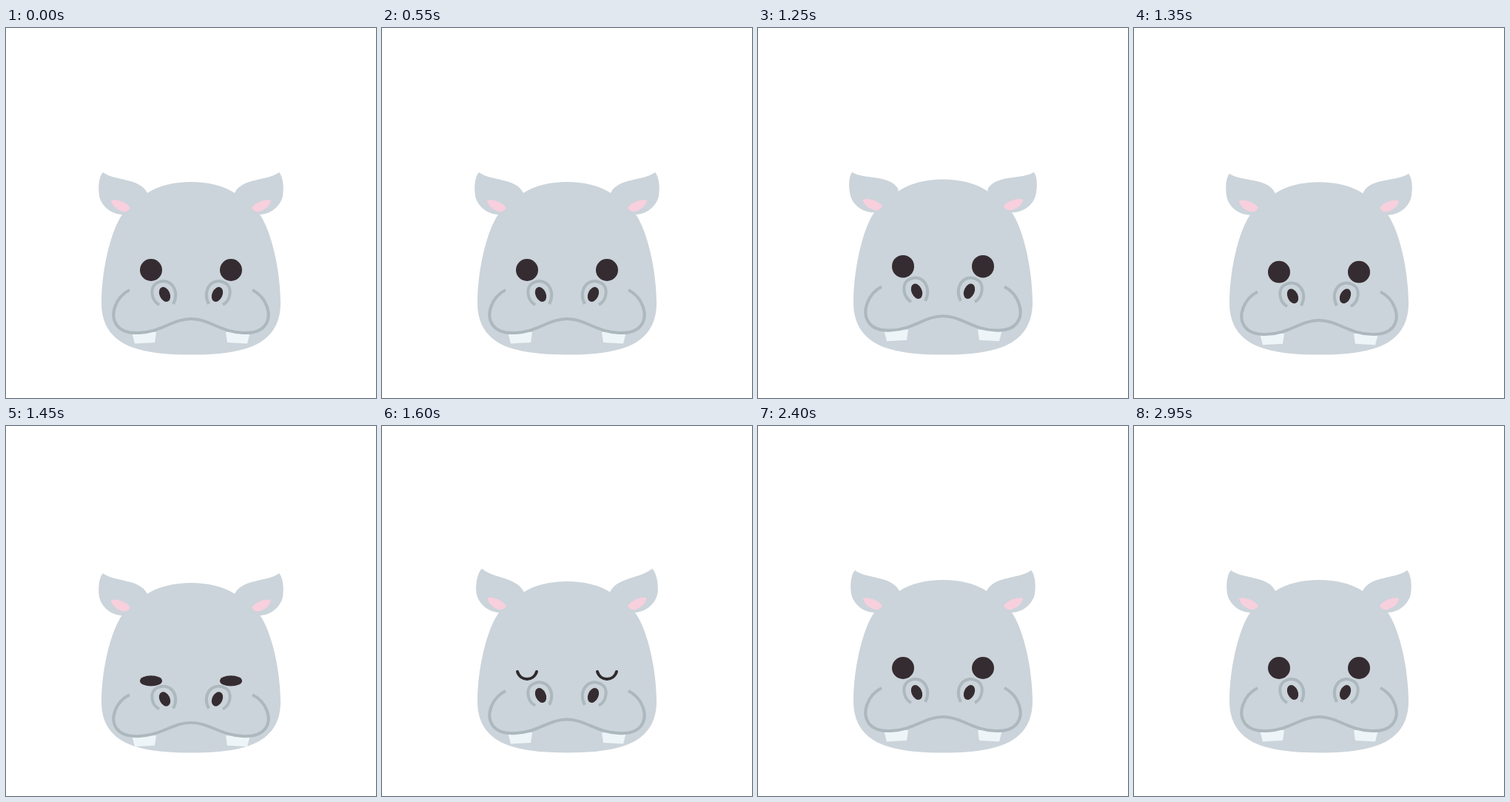
Recreate the animation shown at these times as an HTML page. Size 500x500 px, loop 3000 ms.

```html
<!DOCTYPE html>
<html lang="en">
<head>
<meta charset="utf-8">
<title>Blinking hippo</title>
<style>
  html, body { margin: 0; width: 100%; height: 100%; overflow: hidden; background: #fff; }
  svg { display: block; width: 100vw; height: 100vh; }
  .skin { fill: #cbd4da; }
  .line { fill: none; stroke: #acb8bd; stroke-width: 4; }
  .dark { fill: #352c31; }
</style>
</head>
<body>
<svg viewBox="0 0 500 500">
  <g id="half">
    <path id="head" class="skin" d="M250 208 C228 208 206 213 191 223 C177 232 165 242 157 252 C140 277 129 331 129 372 C129 405 147 425 177 433.500 C199 440 224 441.500 250 441.500Z"/>
    <path id="ear" class="skin" d="M131 195 C146 207 181 202 191 223 L190 245 L160 252 C143 253 129 241 126 227 C124 214 126 200 131 195Z"/>
    <path id="inner" fill="#f8cfdd" d="M142 233 C149 230 164 236 168 243 C166 246 163 249 158 248 C150 246 143 240 142 233Z"/>
    <g id="face">
      <path fill="#eef5f8" d="M170 411 H203 L201 425 L174 426.500Z"/>
      <path class="line" d="M167 354 C149 363 139 387 150 402 C157 411 168 412.500 179 412 C211 411 225 393 250 393"/>
      <path class="line" d="M207 374 C196 368 193 349 205 344 C221 336 236 354 226 373"/>
      <ellipse class="dark" cx="214.500" cy="360" rx="7" ry="10.500" transform="rotate(-24 214.500 360)"/>
      <ellipse id="eye" class="dark" cx="196" rx="15"/>
      <path id="lid" d="M183 327.500 C187 341 205 341 209 327.500" fill="none" stroke="#2f292d" stroke-width="4" stroke-linecap="round"/>
    </g>
  </g>
  <use href="#half" transform="translate(500) scale(-1 1)"/>
</svg>
<script>
const LOOP = 3000, STEP = 50;
const CHIN = 441.5, HEAD_TOP = 208, NOSE = 360, FACE_BASE = 620;
const EYE_BOTTOM = 342, EYE_R = 15;

// Offsets of each part in px, and the ear turn in degrees
const REST = { nose: 0, top: 0, ear: 0, turn: 0 };
const poses = [
  { t: 950, ...REST },
  { t: 1250, nose: -4.3, top: -3.5, ear: -3.5, turn: -5 },
  { t: 1450, nose: 9, top: 4, ear: 4, turn: 0 },
  { t: 1600, nose: 4, top: 2, ear: 0.5, turn: 5 },
  { t: 1800, ...REST },
];

const part = id => document.getElementById(id);
const move = (id, transform) => part(id).setAttribute("transform", transform);
const mix = (a, b, p) => a + (b - a) * p;

function ease(from, to, t) {
  const p = Math.min(1, Math.max(0, (t - from) / (to - from)));
  return p * p * (3 - 2 * p);
}

function poseAt(t) {
  const i = Math.max(1, poses.findIndex(p => p.t >= t));
  const a = poses[i - 1], b = poses[i], p = ease(a.t, b.t, t);
  return Object.fromEntries(Object.keys(REST).map(k => [k, mix(a[k], b[k], p)]));
}

// Vertical stretch that keeps `base` still and shifts height `y` by `dy`
function stretch(base, y, dy) {
  const s = 1 - dy / (base - y);
  return `translate(0 ${base * (1 - s)}) scale(1 ${s})`;
}

function draw(t) {
  const { nose, top, ear, turn } = t < poses.at(-1).t ? poseAt(t) : REST;
  move("head", stretch(CHIN, HEAD_TOP, top));
  move("face", stretch(FACE_BASE, NOSE, nose));
  move("ear", `translate(0 ${ear}) rotate(${turn} 165 240)`);
  move("inner", `translate(0 ${ear * 0.6}) rotate(${turn / 2} 165 240)`);

  // The upper lid drops while the bottom of the eye stays put
  const open = 1 - ease(1350, 1550, t) + ease(1600, 1800, t);
  const closed = open < 0.2;
  part("eye").setAttribute("ry", EYE_R * open);
  part("eye").setAttribute("cy", EYE_BOTTOM - EYE_R * open);
  part("eye").style.display = closed ? "none" : "";
  part("lid").style.display = closed ? "" : "none";
}

const start = performance.now();
function tick() {
  const t = (performance.now() - start) % LOOP;
  draw(Math.floor(t / STEP) * STEP);
  requestAnimationFrame(tick);
}
tick();
</script>
</body>
</html>
```
